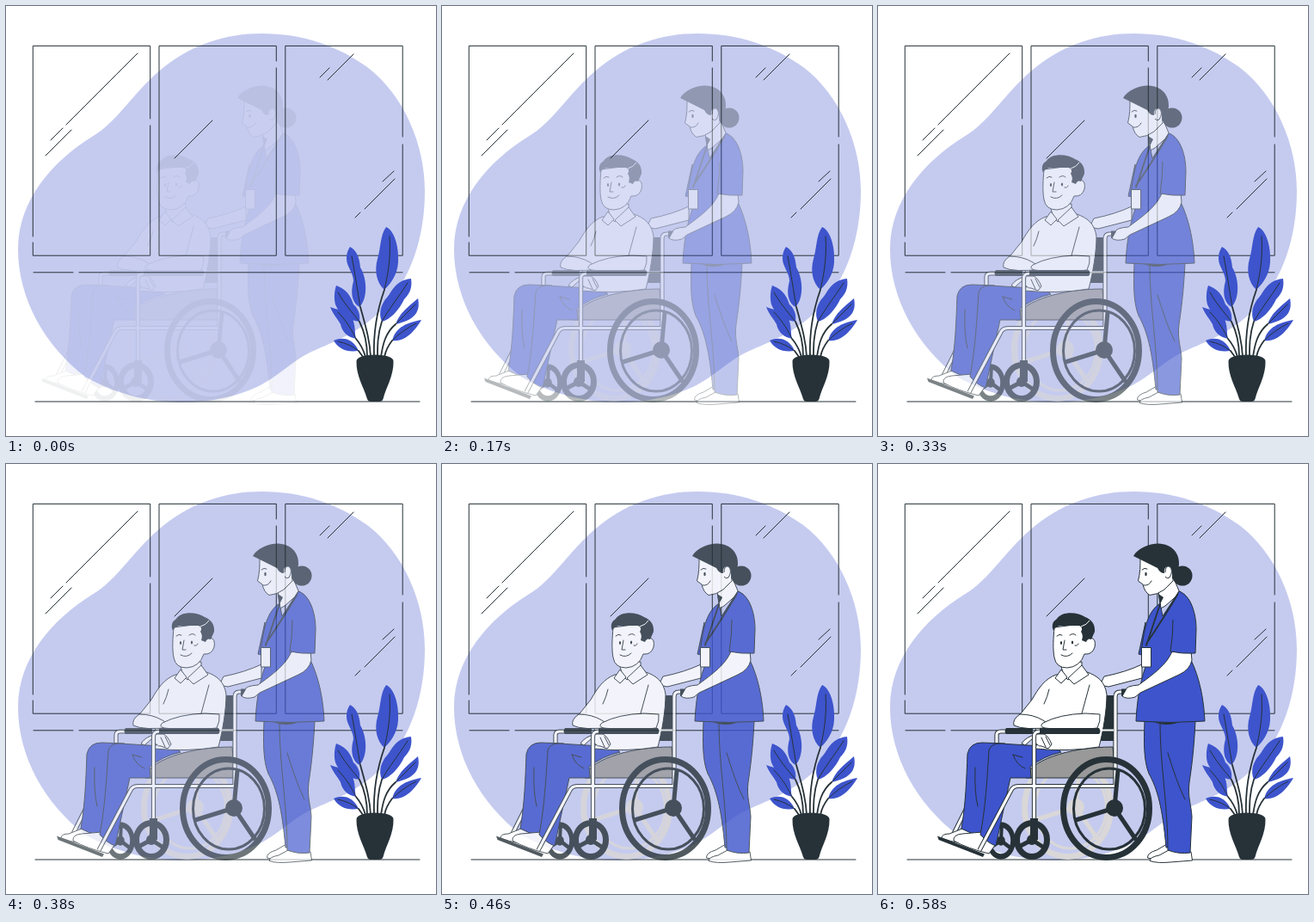
These frames come from a looping animation (500x500 px, 0.62 s). An HTML page:

```html
<!DOCTYPE html>
<html lang="en">
<head>
<meta charset="utf-8">
<title>Nurse pushing a wheelchair</title>
<style>
  html, body { margin: 0; width: 100%; height: 100%; overflow: hidden; background: #fff; }
  svg { display: block; width: 100%; height: 100%; }

  .line { fill: none; stroke: #263238; stroke-width: 1; stroke-linecap: round; stroke-linejoin: round; }
  .stems, .strap { stroke-width: 1.8; }
  .blue, .white, .grey { stroke: #263238; stroke-width: 1; stroke-linejoin: round; }
  .blue { fill: #3d54cc; }
  .white { fill: #fff; }
  .grey { fill: #999; }
  .dark { fill: #263238; }
  .leaf { fill: #3d54cc; }
  .tube-edge, .tube { fill: none; stroke: #263238; stroke-width: 5.2; stroke-linejoin: round; }
  .tube { stroke: #fff; stroke-width: 3.2; }
  .near { color: #263238; }
  .far { color: #d9d7d7; }

  /* Slides right while fading in, at 24 pictures per second. */
  #people { animation: arrive 620ms infinite; }
  @keyframes arrive {
    0%      { transform: translateX(-28px); opacity: .0667; animation-timing-function: steps(3, end); }
    19.354% { transform: translateX(-22px); opacity: .2667; animation-timing-function: step-end; }
    27.419% { transform: translateX(-20px); opacity: .3333; animation-timing-function: steps(4, end); }
    53.225% { transform: translateX(-12px); opacity: .6; animation-timing-function: step-end; }
    61.29%  { transform: translateX(-10px); opacity: .6667; animation-timing-function: steps(5, end); }
    93.548%, 100% { transform: none; opacity: 1; }
  }
</style>
</head>
<body>
<svg viewBox="0 0 500 500">
  <defs>
    <g id="wheel" fill="none" stroke="currentColor">
      <ellipse cx="265.5" cy="400.5" rx="50" ry="57" stroke-width="7"/>
      <ellipse cx="269" cy="401" rx="41.5" ry="47" stroke-width="3"/>
      <path d="M275 400L279 356M275 400L230 414M275 400L300 437" stroke-width="5"/>
      <circle cx="275" cy="400" r="10" fill="currentColor" stroke="none"/>
    </g>
    <g id="castor" fill="none" stroke="#263238">
      <ellipse rx="17.5" ry="19.5" stroke-width="7"/>
      <path d="M0 0L1-18M0 0L-15 8M0 0L14 9" stroke-width="5"/>
      <circle r="6" class="dark" stroke="none"/>
    </g>
    <path id="far-tubes" d="M138 327V315Q138 311 143 311H150M103 400L88 430"/>
    <path id="near-tubes" d="M288 265H281Q276 265 276 271V376M276 374.500H163Q157 374.500 154.500 380L118 449M181.500 414V317Q181.500 311 188 311H192"/>
  </defs>

  <!-- Room -->
  <path fill="#c5cbef" d="M297 32C345 32 385 46 420 71C462 103 487 160 487 215C487 270 470 318 440 350C415 377 385 389 362 399C340 408 328 420 309 433C285 450 245 461 205 461C165 461 125 450 92 431C45 395 14 340 14 283C14 225 55 180 100 152C130 135 150 97 185 70C217 45 255 32 297 32Z"/>
  <g class="line">
    <path d="M31.300 268V46.400H167.700V131M167.700 139V290.200H31.300V275"/>
    <path d="M314.300 64V46.400H178V290.200H314.300V72"/>
    <path d="M461.200 152V46.400H324.800V290.200H461.200V161"/>
    <path d="M153 55L70 138M66 142L52 156M76 144L46 174M240 133L196 177M404 56L374 86M376 72L365 83M451 192L438 204M452 201L417 236M412 240L406 246"/>
    <path d="M32 309.800H78M85 309.800H461M34 460H481"/>
  </g>

  <!-- Plant -->
  <g class="leaf">
    <path d="M442 257C453 262 457 283 456 298C455 314 446 324 440 330C431 322 428 308 432 294C436 281 435 266 442 257Z"/>
    <path d="M400 280C409 285 411 294 412 304C420 317 421 340 411 350C401 344 401 331 404 320C404 310 396 303 396 294C396 287 398 283 400 280Z"/>
    <path d="M384 325C397 330 401 338 404 347C411 353 412 361 411 367C399 366 387 358 383 347C381 339 382 331 384 325Z"/>
    <path d="M377 350C386 354 395 352 402 362C407 371 405 380 407 387C398 385 391 380 389 370C385 363 380 358 377 350Z"/>
    <path d="M381 389C392 384 404 387 410 401C396 403 387 399 381 389Z"/>
    <path d="M471 317C473 329 468 336 463 341C458 352 447 365 437 367C433 357 436 349 441 341C448 336 450 319 471 317Z"/>
    <path d="M479 340C482 354 477 365 453 370C457 358 467 350 479 340Z"/>
    <path d="M483 365C475 379 463 391 449 389C453 373 467 368 483 365Z"/>
  </g>
  <path class="line" d="M446 268C448 295 443 316 440 330M402 291C406 312 409 333 412 350M386 333C396 350 405 359 411 367M386 356C397 367 403 379 407 387M386 390Q400 393 410 401M467 322C456 339 444 354 437 367M476 347Q463 360 453 370M477 369Q461 377 449 389"/>
  <path class="line stems" d="M440 330C430 358 427 382 428 408M412 350C418 372 423 388 424 408M411 367C417 379 420 394 420 408M407 387C413 394 416 401 418 408M410 401L415 408M437 367C432 382 432 395 432 408M453 370C441 380 438 394 436 408M449 389Q442 398 440 408"/>
  <path class="dark" d="M407.500 413Q408 406 429 405.500Q450 406 450.500 413C451 430 442 443 438.500 457Q437.500 460 434 460H424Q421 460 420 457C416 443 407 430 407.500 413Z"/>

  <g id="people">
    <!-- Far side of the chair -->
    <use href="#wheel" class="far" x="-45" y="-1"/>
    <use href="#castor" transform="translate(143 438) scale(.8 .95)"/>
    <use href="#far-tubes" class="tube-edge"/>
    <use href="#far-tubes" class="tube"/>

    <!-- Nurse -->
    <path class="white" d="M307 233Q288 242 263 247L258 257L268 259L307 249Z"/>
    <path class="blue" d="M311 184L303 221L311 223Z"/>
    <path class="white" d="M336 442L324 449Q313 452 313.500 458Q326 462 342 456Z"/>
    <path class="blue" d="M310 299C309 325 309 345 315 360C325 378 331 400 335 446L352 446L350 300Z"/>
    <path class="white" d="M338 449L327 455Q316 457 316 461.500Q325 464.500 340 463L365.500 461L364 451Z"/>
    <path class="blue" d="M328 300C328 330 331 356 333 379Q337 420 337 449Q350 454 363 452L365 410C364 395 360 388 362 370C366 345 368 320 369 299Z"/>
    <path class="line" d="M337 336C343 355 349 374 357 390"/>
    <path class="dark" d="M318 299H353Q336 307 318 299Z"/>

    <path class="white" d="M326 148L328 163L325 170L334 165L351 150L344 133Z"/>
    <path class="blue" d="M328 162C316 170 311 184 308 205L306 218L311 236C304 256 301 278 300 299Q340 302 380 299C379 274 374 249 364 228L366 170C364 160 358 151 350 148L331 177Z"/>
    <path class="dark" d="M326 151L328 163L332 155Z"/>
    <path class="line strap" d="M328 163L312 211M350 149Q333 178 312 209"/>
    <rect class="white" x="306.500" y="213.500" width="11" height="22.500"/>

    <path class="white" d="M305 108C305 119 305 126 302.500 136L308 140Q310 149 316 152.500Q325 152 333 146L343 136L344 112Z"/>
    <circle class="dark" cx="354" cy="130" r="11.500"/>
    <path class="dark" d="M297 107C302 98 315 92.500 326 92.500C342 93 351 104 350 117Q349 128 342 134Q343 119 337 119Q332 120 333 127Q328 127 325 121Q313 115 297 107Z"/>
    <path class="white" d="M334 126Q334 118 339 119Q344 124 339 132Q336 134 334 131" stroke="none"/>
    <ellipse class="dark" cx="311.500" cy="128" rx="1.200" ry="2.300"/>
    <path class="line" d="M307 123Q310 120 313 122M309 141Q315 142 318 136"/>

    <!-- Backrest -->
    <path class="dark" d="M259 269H275V322H254Z"/>

    <!-- Man -->
    <path class="grey" d="M172 365C174 346 220 329 273 329L276 365Z"/>
    <path class="white" d="M74 435Q74 430 83 430L98 424L119 432L116 442Q95 443 74 435Z"/>
    <path class="blue" d="M104 337Q107 324 121 324L148 325L140 360L121 432Q107 430 97 424C102 395 103 365 104 337Z"/>
    <path class="white" d="M88 438Q87 431 98 430L121 428L137 442L129 453Q104 447 88 438Z"/>
    <path class="blue" d="M129 333Q131 325 142 325L190 328Q211 331 213 335Q192 340 177 352L178 365H154L150 383L137 444Q128 441 119 431C125 400 127 365 129 333Z"/>
    <path class="line" d="M113 353Q112 382 116 398M157 338Q161 350 171 354M157 338L168 341"/>

    <path class="white" d="M207 245C194 250 187 260 179 274L163 294Q182 304 188 314L183 331Q220 335 257 329C262 310 266 286 266 268C264 253 255 246 243 242Z"/>
    <path class="white" d="M184 314Q171 318 167 325L171 327L180 319Q185 329 190 328L198 331L202 326Q198 316 193 314Z"/>
    <path class="line" d="M190 318L195 329M195 317L200 327"/>
    <path class="white" d="M165 291Q156 297 158 304Q170 310 203 306L192 298Q180 291 165 291Z"/>
    <path class="white" d="M241 290Q211 291 192 301Q187 305 194 307Q225 311 255 307Q259 299 258 291Z"/>
    <path class="line" d="M246 257L237 290M199 262Q197 271 193 279"/>
    <path class="white" d="M212 232L216 246L221 251L237 242L237 230Z"/>
    <path class="white" d="M213 239L206 249L213 255L220 248Z"/>
    <path class="white" d="M237 234L221 249L228 256L245 245Z"/>

    <path class="white" d="M205 190C204 202 203 215 205 225Q207 237 220 237Q235 236 240 221Q249 222 252 213Q254 203 247 202L243 185Z"/>
    <path class="dark" d="M204 194Q200 185 208 180C214 171 232 172 241 178Q253 183 252 195L248 204Q244 202 242 207L237 205Q239 199 236 195Q239 190 234 188Q217 188 211 188Q205 190 204 194Z"/>
    <path d="M236 189Q243 187 246 182" stroke="#fff" fill="none"/>
    <ellipse class="dark" cx="213" cy="208" rx="1.100" ry="2.100"/>
    <ellipse class="dark" cx="226" cy="207.500" rx="1.100" ry="2.100"/>
    <path class="line" d="M208 200Q211 197 214 199M223 199Q227 196 230 199M217 205L215 216H219M213 222Q220 226 226 220M229 211Q232 212 233 209"/>

    <!-- Near side of the chair -->
    <path class="dark" d="M69 432.500L124 453.500L122 457L70.500 437Z"/>
    <use href="#near-tubes" class="tube-edge"/>
    <use href="#near-tubes" class="tube"/>
    <path d="M255 309.500H274" stroke="#fff" stroke-width="2"/>
    <path class="dark" d="M149 307H180V314H149Q146 311 149 307ZM188 307H257Q260 311 257 314H188Z"/>
    <path class="dark" d="M177 412H186V437H177ZM283 261.500H297Q300 266 297 270H283Z"/>
    <use href="#castor" transform="translate(179 437)"/>
    <use href="#wheel" class="near"/>

    <!-- Nurse's near arm -->
    <path class="white" d="M342 218C336 231 328 239 303 257Q288 258 288 263L284 270Q289 274 299 271L305 266L350 245Q363 239 365 228L364 218Z"/>
    <path class="blue" d="M350 148C364 153 370 174 370 192L369 220Q354 221 340 218Q343 200 343 181"/>
  </g>
</svg>
</body>
</html>
```
